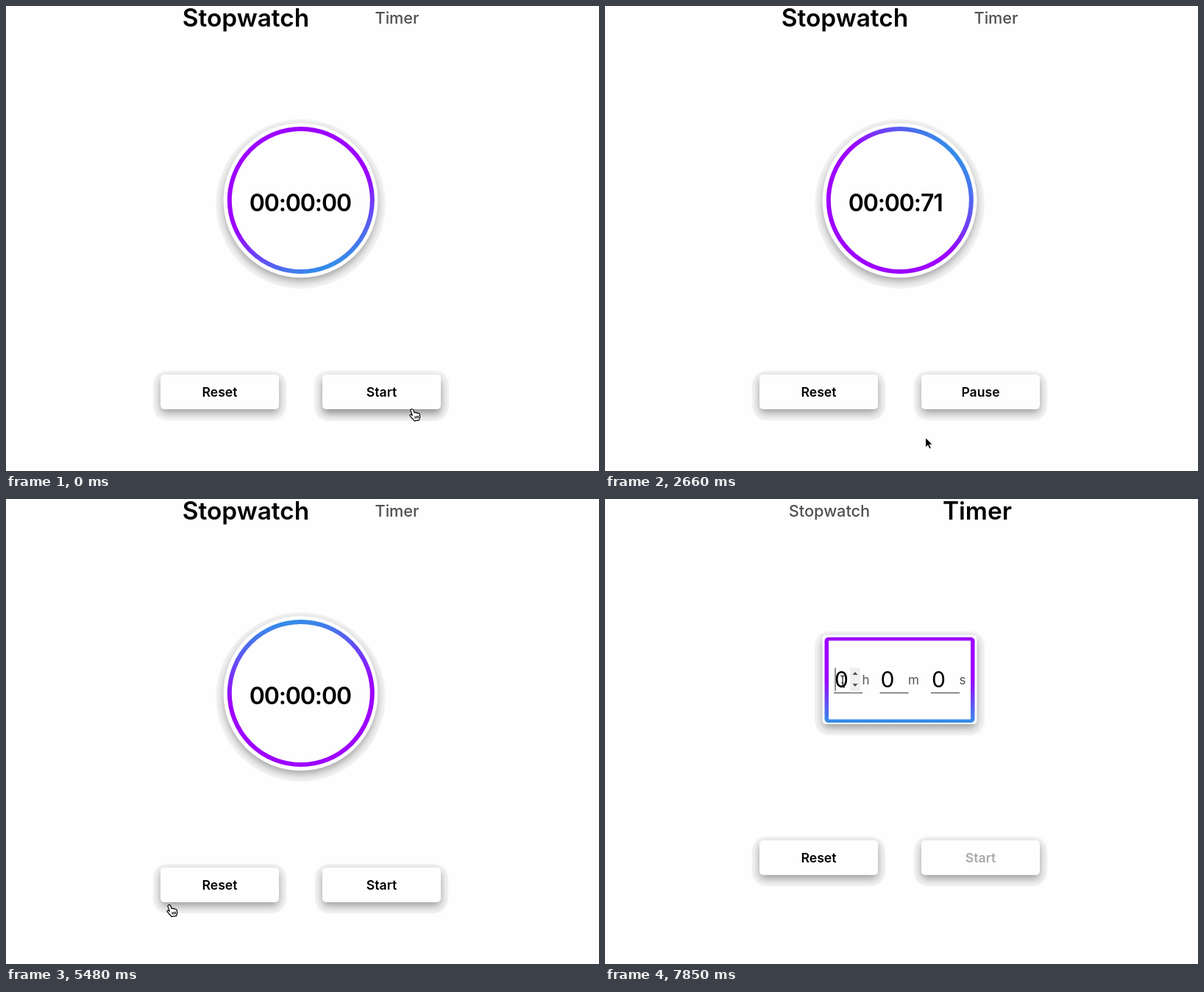
An HTML page for the animation above (8 s loop, 806 by 632 pixels).

```html
<!DOCTYPE html>
<html lang="en">
<head>
<meta charset="utf-8">
<title>Stopwatch</title>
<style>
  html, body { margin: 0; width: 100%; height: 100%; overflow: hidden; background: #fefefe; }
  svg { display: block; width: 806px; height: 632px; }
  text { font-family: Inter, "Open Sans", sans-serif; font-weight: 600; }
  .mid { text-anchor: middle; }
  .unit { font-size: 17px; font-weight: 400; fill: #555; }
  .field { font-size: 30px; font-weight: 400; }
</style>
</head>
<body>
<svg viewBox="0 0 806 632">
  <defs>
    <linearGradient id="ringFill" gradientUnits="userSpaceOnUse" x1="400.8" y1="164" x2="400.8" y2="364">
      <stop offset=".5" stop-color="#9d00ff"/><stop offset="1" stop-color="#338fe8"/>
    </linearGradient>
    <linearGradient id="cardFill" x1="0" y1="0" x2="0" y2="1">
      <stop offset=".48" stop-color="#9d00ff"/><stop offset="1" stop-color="#338fe8"/>
    </linearGradient>
    <filter id="soft" x="-20%" y="-60%" width="140%" height="220%"><feGaussianBlur stdDeviation="6"/></filter>
  </defs>
  <rect width="806" height="632" fill="#fefefe"/>

  <text id="tabA" class="mid">Stopwatch</text>
  <text id="tabB" class="mid">Timer</text>

  <g id="watch">
    <circle cx="400.5" cy="269" r="115" fill="#f4f4f4"/>
    <circle cx="400.5" cy="269" r="104.5" opacity=".36" filter="url(#soft)"/>
    <circle cx="400.5" cy="264.2" r="105" fill="#fefefe"/>
    <circle cx="400.8" cy="264" r="97" fill="none" stroke="url(#ringFill)" stroke-width="6"/>
    <text id="count" x="330.7" y="279" font-size="32" letter-spacing="-1.1"></text>
  </g>

  <g id="timer">
    <rect x="285" y="180" width="231" height="141" rx="20" fill="#f4f4f4"/>
    <rect x="296" y="190" width="209" height="121" rx="5" opacity=".36" filter="url(#soft)"/>
    <rect x="295.5" y="185" width="210" height="121" rx="5" fill="#fefefe"/>
    <rect x="298.5" y="188" width="204" height="116" rx="5" fill="url(#cardFill)"/>
    <rect x="304" y="192.5" width="193" height="107" rx="1" fill="#fefefe"/>
    <g id="fields"></g>
    <g id="spin">
      <rect x="333" y="229" width="14" height="34" fill="#efefef"/>
      <path d="M336.5 239h7l-3.5-4zM336.5 251h7l-3.5 4z" fill="#505050"/>
    </g>
    <path id="caret" d="M313 229.5v31.5" stroke="#222"/>
  </g>

  <g id="buttons">
    <g id="reset"></g>
    <g id="start"></g>
  </g>

  <g id="cursor">
    <path id="arrow" d="M.5 .5V14l3.1-2.9 2.2 5 2.4-1-2.2-4.9h4.2z" fill="#000" stroke="#fff" stroke-width="1"/>
    <path id="hand" transform="translate(-4 -1)" fill="#fff" stroke="#000" stroke-width="1.2" stroke-linejoin="round"
      d="M3.6.8c1.2-.2 1.9.6 2.3 1.8l1.2 3.2c.8-.8 2-.6 2.4.3.9-.6 2-.3 2.3.6 1.2-.4 2.2.3 2.4 1.6l.4 2.5c.2 2-.8 3-1 5l-6.6 1c-.5-1.5-2.2-2.2-3.6-4L1.2 10c-.8-1.2.5-2.2 1.8-1.4l1.3.9L2 3C1.6 1.8 2.4 1 3.6.8zM7.8 10.5l.6 3.2M10 10.2l.5 3.2M12.1 9.9l.4 3.2"/>
    <path id="beam" d="M-3-8q3 0 3 2.5q0-2.5 3-2.5M0-5.5V5.5M-3 8q3 0 3-2.5q0 2.5 3 2.5M-1.5 2h3" fill="none" stroke="#111" stroke-width="1.2"/>
  </g>
</svg>
<script>
const $ = id => document.getElementById(id);
const LOOP = 8000, STEP = LOOP / 54;
const START = 1574, RESET = 5180, SWITCH = 6900, FOCUS = 7650;

// time, x, y of the pointer's hot spot
const path = [
  [0, 552, 548], [300, 573, 550], [740, 552, 548], [1040, 526, 544], [1340, 513, 538],
  [1640, 513, 538], [1930, 488, 575], [2220, 460, 598], [2660, 436, 586], [3400, 342, 580],
  [3850, 338, 578], [4450, 305, 560], [4740, 287, 539], [5200, 287, 540], [5480, 222, 552],
  [5770, 229, 534], [6070, 440, 245], [6220, 536, 89], [6520, 537, 18], [7050, 533, 16],
  [7450, 380, 190], [7700, 323, 248], [8000, 323, 248]
];

const mix = (a, b, k) => a + (b - a) * k;
const clamp = k => Math.max(0, Math.min(1, k));
const show = (id, on) => $(id).setAttribute('display', on ? 'inline' : 'none');
const set = (id, attrs) => { for (const k in attrs) $(id).setAttribute(k, attrs[k]); };
const pad = n => String(n).padStart(2, '0');

function button(id, x, label) {
  $(id).innerHTML =
    `<rect id="${id}Halo" x="${x - 10}" y="496" width="181" height="67" rx="20" fill="#f4f4f4"/>
     <rect id="${id}Shade" x="${x}" y="506" width="161" height="47" rx="5" opacity=".36" filter="url(#soft)"/>
     <rect x="${x}" y="501" width="161" height="47" rx="5" fill="#fefefe"/>
     <text id="${id}Text" class="mid" x="${x + 80.5}" y="531" font-size="17.6">${label}</text>`;
}
button('reset', 210, 'Reset');
button('start', 430, 'Start');

$('fields').innerHTML = [[311, 'h'], [373.5, 'm'], [443, 's']].map(([x, unit]) =>
  `<text class="field" x="${x + 1}" y="256">0</text>
   <path d="M${x} 263.5h39" stroke="#666" stroke-width="1.6"/>
   <text class="unit" x="${x + 38.5}" y="252">${unit}</text>`).join('');

function pointer(t) {
  let i = 1;
  while (i < path.length - 1 && path[i][0] < t) i++;
  const [t0, x0, y0] = path[i - 1], [t1, x1, y1] = path[i];
  const k = clamp((t - t0) / (t1 - t0));
  return [mix(x0, x1, k), mix(y0, y1, k)];
}

function tab(id, bigX, smallX, size) {
  const grey = Math.round(mix(80, 0, size));
  set(id, {
    x: mix(smallX, bigX, size), y: mix(24, 28, size),
    'font-size': mix(21.7, 33.4, size), fill: `rgb(${grey},${grey},${grey})`
  });
  $(id).style.fontWeight = mix(500, 600, size);
}

function draw(t) {
  const timer = t >= SWITCH;
  const running = t >= START && t < RESET;
  const k = clamp((t - SWITCH) / 300);
  tab('tabA', 326, 305, 1 - k);
  tab('tabB', 506, 531.5, k);

  show('watch', !timer);
  show('timer', timer);
  set('ringFill', { gradientTransform: `rotate(${157 + t * .364 - 180} 400.8 264)` });
  const n = running ? Math.floor((t - START) * .0655) : 0;
  $('count').textContent = `00:${pad(Math.floor(n / 100))}:${pad(n % 100)}`;

  set('buttons', { transform: `translate(0 ${timer ? -37 : 0})` });
  $('startText').textContent = running ? 'Pause' : 'Start';
  set('startText', { fill: timer ? '#aaa' : '#000' });
  const h = t < 1900 ? 1 : 0;
  set('startHalo', { x: 420 - h, y: 496 - h, width: 181 + 2 * h, height: 67 + 2 * h });
  set('startShade', { y: 506 + h, opacity: .36 + .06 * h });

  const [x, y] = pointer(t);
  const overButton = !timer && y > 500 && y < 552 && (x > 210 && x < 371 || x > 430 && x < 591);
  const overTab = x > 490 && x < 565 && y < 40;
  const overField = timer && x > 310 && x < 350 && y > 225 && y < 265;
  const hand = overButton || overTab;
  set('cursor', { transform: `translate(${x} ${y})` });
  show('hand', hand);
  show('beam', overField);
  show('arrow', !hand && !overField);
  show('spin', overField);
  show('caret', t >= FOCUS);
}

function frame(now) {
  const step = Math.min(53, Math.floor((now % LOOP + 9) / STEP));
  draw(step * STEP);
  requestAnimationFrame(frame);
}
draw(0);
requestAnimationFrame(frame);
</script>
</body>
</html>
```
